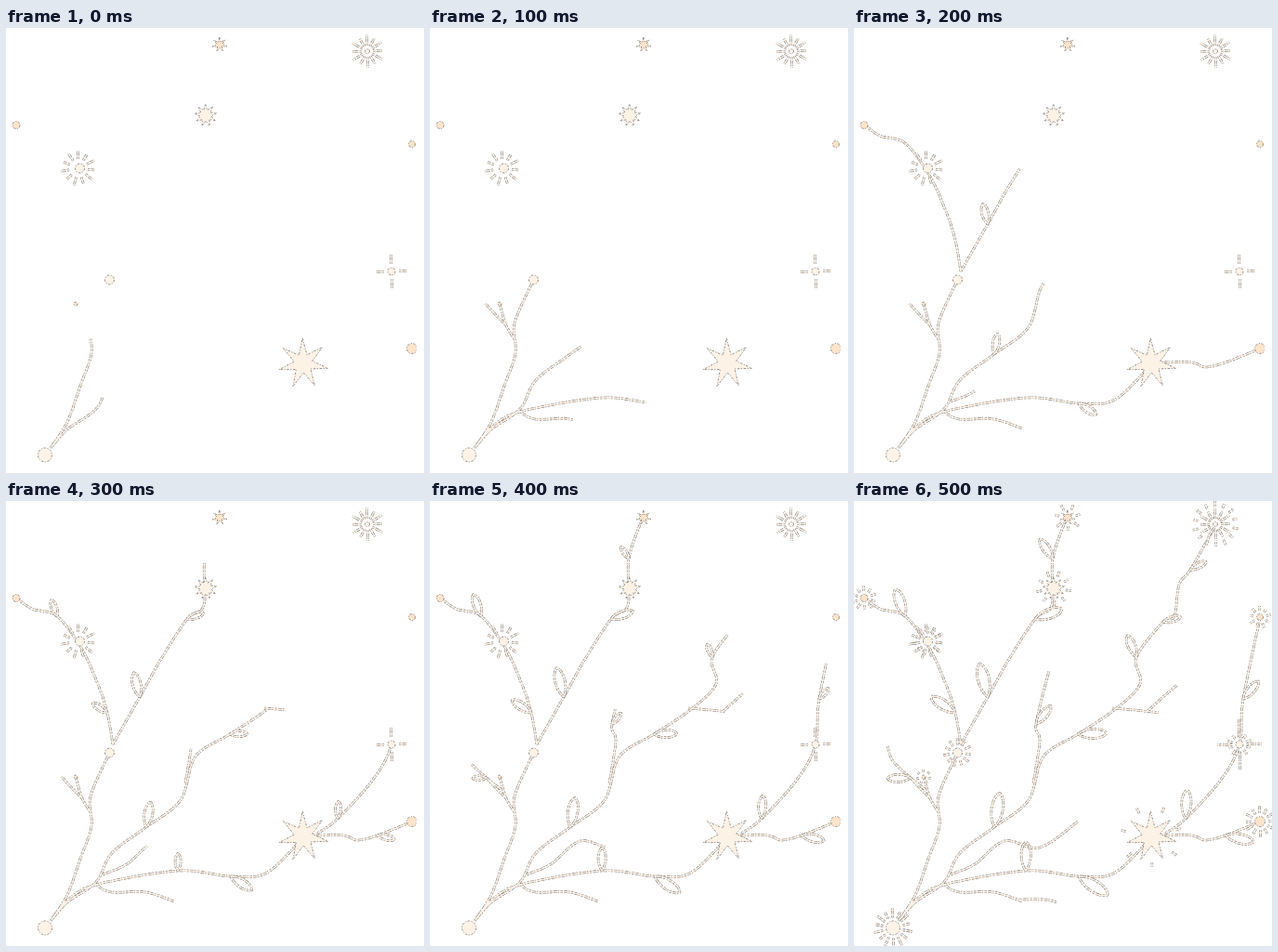
An HTML page with a canvas for the animation above (600 ms loop, 450 by 479 pixels).

```html
<!DOCTYPE html>
<html lang="en">
<head>
<meta charset="utf-8">
<title>Growing star branches</title>
<style>
html, body { margin: 0; width: 100%; height: 100%; overflow: hidden; background: #fff; }
canvas { display: block; }
</style>
</head>
<body>
<canvas id="stage" width="450" height="479"></canvas>
<script>
const ctx = document.getElementById('stage').getContext('2d');
const GREY = '#7b7772', CREAM = '#fdf2e6', PEACH = '#fce4cb';
const LAST = 5, SAMPLES = 10, TAU = 2 * Math.PI;
const LEAF_ANGLE = { L: -.75, R: .55, U: -1.5 };
const boughs = [], leaves = [];
let step = 0;

// Catmull-Rom curve through a, b, c, d, between b and c
const spline = (a, b, c, d, t) =>
  b + t / 2 * (c - a + t * (2 * a - 5 * b + 4 * c - d + t * (3 * (b - c) + d - a)));

// A curve through a few points that grows to its full length in some steps.
// "L2" after a point puts a leaf there: on the left, from step 2 on.
function bough(birth, steps, ease, text) {
  const marks = text.trim().split(/\s+/).map(m => m.match(/([\d.]+),([\d.]+)([LRU])?(\d)?/));
  const keys = marks.map(m => [+m[1], +m[2]]);
  const end = keys.length - 1;
  const key = i => keys[Math.max(0, Math.min(end, i))];
  const points = [];
  let length = 0;
  for (let i = 0; i <= end * SAMPLES; i++) {
    const k = Math.min(end - 1, Math.floor(i / SAMPLES)), t = i / SAMPLES - k;
    const [x, y] = [0, 1].map(n =>
      spline(key(k - 1)[n], key(k)[n], key(k + 1)[n], key(k + 2)[n], t));
    const before = points[i - 1];
    if (before) length += Math.hypot(x - before.x, y - before.y);
    points.push({ x, y, length });
  }
  boughs.push({ birth, steps, ease, points, length });

  marks.forEach(([, x, y, side, born], i) => {
    if (!side) return;
    const a = key(i - 1), b = key(i + 1);
    const angle = Math.atan2(b[1] - a[1], b[0] - a[0]) + LEAF_ANGLE[side];
    leaves.push({ x: +x, y: +y, angle, birth: +born });
  });
}

// Left side
bough(0, 2, 1.6, '48,452 66,424 80,385 92,350 91,318 111,272');
bough(2, 1, 1, '115,262 109,228L3 100,200 82,160 55,124R3 28,116 11,104');
bough(2, 3, 1.6, '115,262 144,211L2 167,170 195,127R3 213,112 214,62L4 229,18');
bough(1, 1, 1, '91,335 82,320 75,297');
bough(1, 1, 1, '82,320 70,308 60,297');
bough(4, 2, 1.6, '76,310 61,298L4 42,280 36,264');

// Middle
bough(0, 6, .8, `50,450 66,432 97,410 114,379 151,351L2 188,322 204,275 241,251R3
  280,225 308,197 304,168L4 333,130R5 345,124 350,90 362,74R5 389,27`);
bough(2, 4, .7, '104,402 130,391 162,366 200,373 241,345');
bough(3, 3, 1, '193,304 200,258 196,240R4 210,183');
bough(3, 3, 1.6, '278,223 303,225 328,228');
bough(4, 2, 1.6, '316,226 335,209 348,198');

// Right side
bough(1, 2, 1.6, '50,449 66,430 97,413 185,398U3 242,404R2 281,400 320,362');
bough(2, 1, 1, '330,360 364,360 378,365 400,360R3 437,345');
bough(3, 3, 1.6, '335,358 357,342L3 395,300 415,262 419,213R4 438,122');
bough(1, 2, 1.6, '97,413 113,421 150,421 181,431');
bough(5, 1, 1, '178,429 205,429 218,432');

// Broken grey edges with a pale core
function twig(path) {
  ctx.lineJoin = 'round';
  ctx.setLineDash([2.5, 1.2, 4, .8, 1.5, 1.4]);
  ctx.strokeStyle = GREY;
  ctx.lineWidth = 2.6;
  ctx.stroke(path);
  ctx.setLineDash([]);
  ctx.strokeStyle = CREAM;
  ctx.lineWidth = 1.5;
  ctx.stroke(path);
}

function shape(path, fill) {
  ctx.fillStyle = fill;
  ctx.fill(path);
  ctx.setLineDash([2.5, 1.6, 1.2, 1.4]);
  ctx.strokeStyle = GREY;
  ctx.lineWidth = .8;
  ctx.stroke(path);
}

function rays(x, y, n, inner, outer, turn = -1.6) {
  const path = new Path2D();
  for (let i = 0; i < n; i++) {
    const a = turn + i * TAU / n, c = Math.cos(a), s = Math.sin(a);
    const end = outer - i % 2 * (outer - inner) * .2;
    path.moveTo(x + inner * c, y + inner * s);
    path.lineTo(x + end * c, y + end * s);
  }
  twig(path);
}

// Dots and stars send out rays in the last step.
function dot(x, y, r, fill = CREAM) {
  const path = new Path2D();
  path.arc(x, y, r, 0, TAU);
  shape(path, fill);
  if (step === LAST) rays(x, y, Math.round(5 + 1.2 * r), r + 3.5, 2.3 * r + 4);
}

function star(x, y, n, outer, inner, fill = CREAM) {
  const path = new Path2D();
  for (let i = 0; i < 2 * n; i++) {
    const a = -1.6 + i * Math.PI / n, r = i % 2 ? inner : outer;
    path.lineTo(x + r * Math.cos(a), y + r * Math.sin(a));
  }
  path.closePath();
  shape(path, fill);
  if (step === LAST) rays(x, y, n, outer + 1, outer + 7, -1.6 + Math.PI / n);
}

function drawBoughs() {
  const path = new Path2D();
  for (const { birth, steps, ease, points, length } of boughs) {
    if (step < birth) continue;
    const t = Math.min(1, (step - birth + 1) / steps);
    const reach = length * (1 - (1 - t) ** ease);
    points.filter(p => p.length <= reach)
      .forEach((p, i) => i ? path.lineTo(p.x, p.y) : path.moveTo(p.x, p.y));
  }
  twig(path);
}

// Leaves that come later stay shorter.
function drawLeaf({ x, y, angle, birth }) {
  if (step < birth) return;
  const growth = birth < LAST ? 1 - .4 * (LAST - step) / (LAST - birth) : 1;
  const size = (49 - 6 * birth) * growth, bulge = size * .22;
  const path = new Path2D();
  path.moveTo(0, 0);
  path.bezierCurveTo(size * .3, bulge, size * .85, bulge, size, 0);
  path.bezierCurveTo(size * .85, -bulge, size * .3, -bulge, 0, 0);
  ctx.save();
  ctx.translate(x, y);
  ctx.rotate(angle);
  twig(path);
  ctx.restore();
}

function drawStars() {
  star(230, 18, 7, 8, 3, PEACH);
  star(215, 94, 9, 12, 6);
  star(320, 361, 7, 27, 10);
  rays(389, 25, 12, 6, 18);
  dot(389, 25, 2.5);
  if (step === LAST) rays(389, 25, 14, 19, 25);
  rays(78, 151, 11, 10, 19);
  dot(79.5, 151, 5);
  rays(415, 262, 4, 8, step === LAST ? 28 : 19);
  dot(415, 262, 4);
  dot(11, 104.5, 4, PEACH);
  dot(437, 125, 3.5, PEACH);
  dot(437, 345, 5.5, PEACH);
  dot(75, 297, 2, PEACH);
  dot(111.5, 271, 5);
  dot(42, 459.5, 7.5);
}

function draw(now) {
  step = Math.floor(now / 100) % (LAST + 1);
  ctx.clearRect(0, 0, 450, 479);
  ctx.save();
  ctx.beginPath();
  ctx.rect(0, 0, step < LAST ? 442 : 450, 479);
  ctx.clip();
  drawBoughs();
  leaves.forEach(drawLeaf);
  drawStars();
  ctx.restore();
  requestAnimationFrame(draw);
}

draw(0);
</script>
</body>
</html>
```
